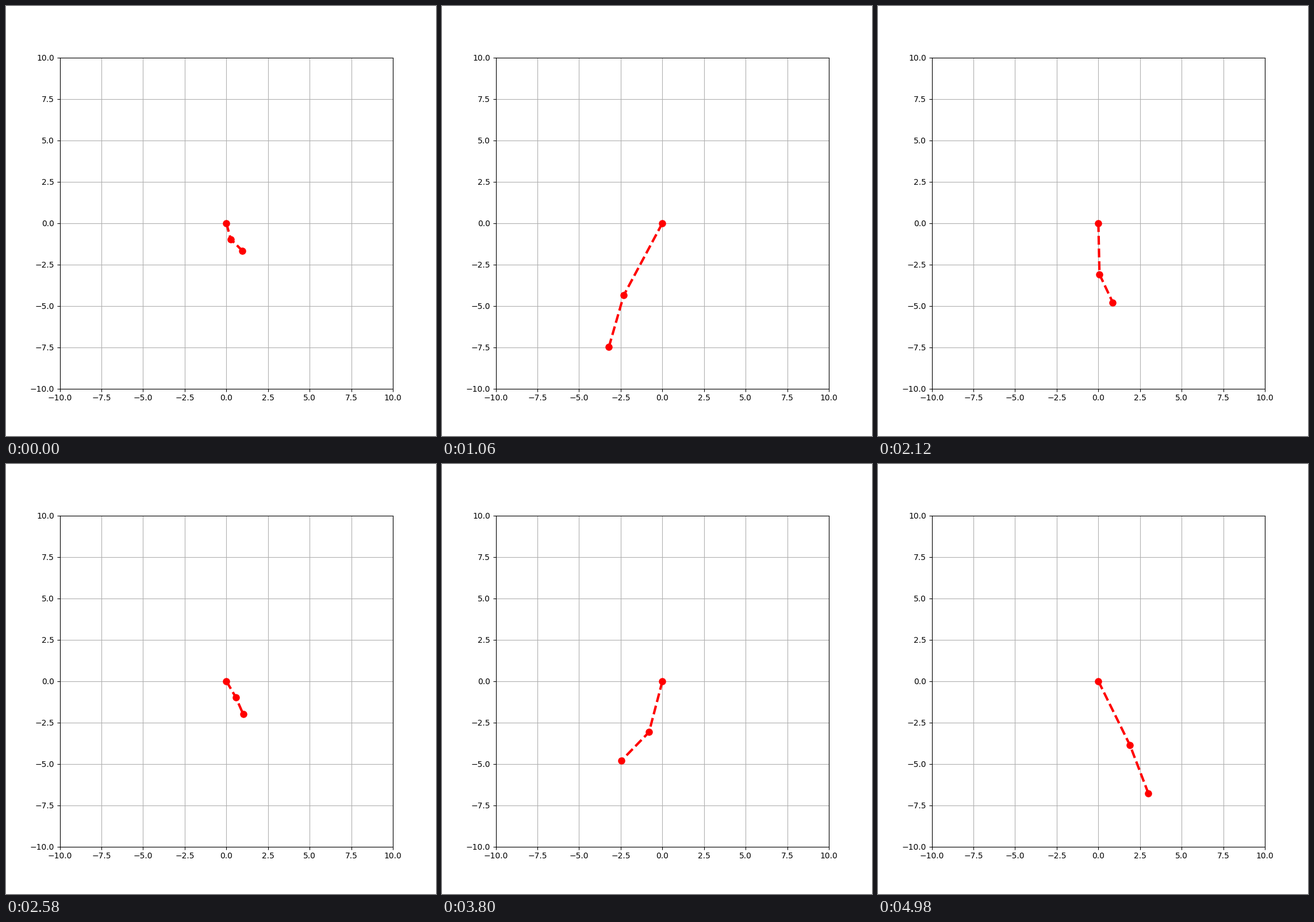
Recreate the animation shown at these times as a matplotlib script. Size 748 px wide and 748 px high, loop 5000 ms.

```python
import numpy as np
import matplotlib.pyplot as plt
from matplotlib.animation import FuncAnimation

FRAMES, DT = 250, 0.02
G, K, REST = 10.0, 10.0, 1.0


def oscillate(A, q0, v0, t):
    """Solve q'' = -A q by normal modes; returns one row per coordinate."""
    w2, modes = np.linalg.eig(A)
    w = np.sqrt(w2)[:, None]
    a = np.linalg.solve(modes, q0)[:, None]
    b = np.linalg.solve(modes, v0)[:, None]
    return modes @ (a * np.cos(w * t) + b / w * np.sin(w * t))


t = np.arange(FRAMES) * DT

# Small-angle double pendulum, unit masses and lengths.
inertia = np.array([[2, 1], [1, 1]])
swing = np.linalg.solve(inertia, np.diag([2 * G, G]))
th1, th2 = oscillate(swing, np.array([np.pi / 12, np.pi / 4]), np.zeros(2), t)

# Two masses hanging on a chain of springs, released at rest length.
chain = K * np.array([[2, -1], [-1, 1]])
sag = G / K * np.array([2.0, 3.0])
s1, s2 = oscillate(chain, -sag, np.array([2.0, 4.0]), t) + sag[:, None]
r1, r2 = REST + s1, REST + s2 - s1

x1, y1 = r1 * np.sin(th1), -r1 * np.cos(th1)
x2, y2 = x1 + r2 * np.sin(th2), y1 - r2 * np.cos(th2)

fig, ax = plt.subplots(figsize=(7.48, 7.48), dpi=100)
ax.set_xlim(-10, 10)
ax.set_ylim(-10, 10)
ax.grid()
line, = ax.plot([], [], "ro--", lw=3, markersize=8)


def update(i):
    line.set_data([0, x1[i], x2[i]], [0, y1[i], y2[i]])
    return line,


ani = FuncAnimation(fig, update, frames=FRAMES, interval=20,
                    repeat=True, repeat_delay=0)
plt.show()
```
